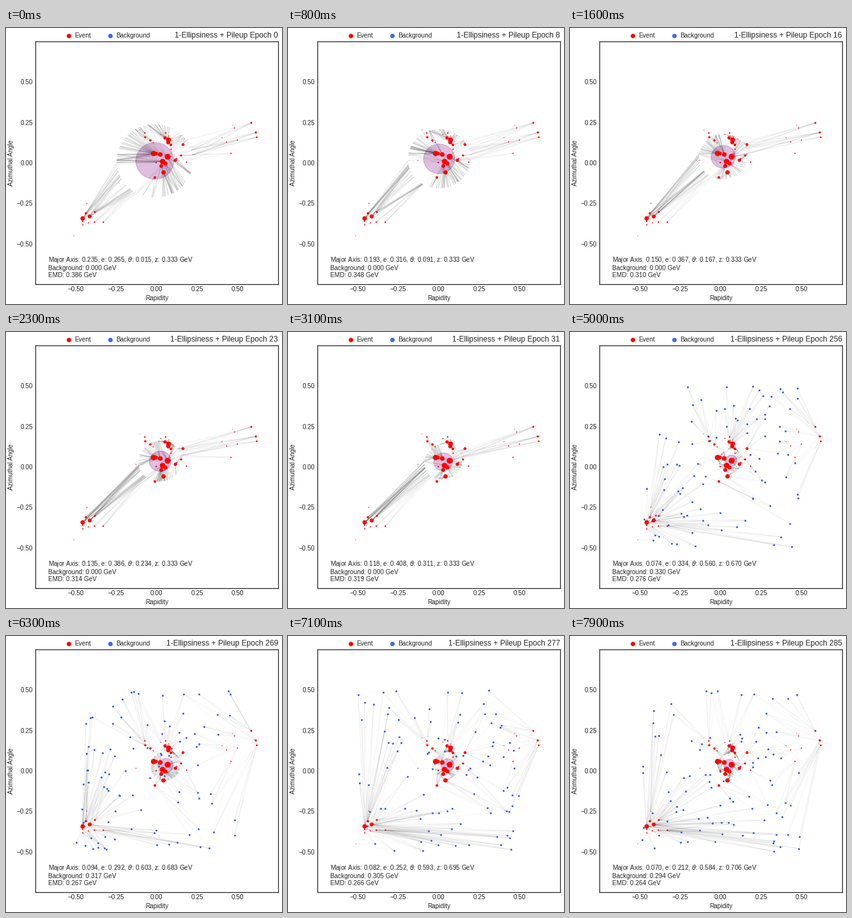
Write a matplotlib script that moves like this. It is 432x432 px and loops after 8000 ms.

```python
import numpy as np
import matplotlib.pyplot as plt
from matplotlib.animation import FuncAnimation
from matplotlib.collections import LineCollection
from matplotlib.patches import Ellipse

FRAMES, INTERVAL = 80, 100
SWITCH, SKIP = 44, 206          # the epoch counter jumps once
CX, CY, UNIT = 235.8, 211.0, 760 / 3
RING, DOTS = 100, 95
INK = "0.15"

plt.rcParams.update({
    "font.family": "Liberation Sans", "font.size": 10,
    "text.color": INK, "axes.labelcolor": INK,
    "xtick.color": INK, "ytick.color": INK,
    "axes.edgecolor": INK, "axes.linewidth": 1.25,
})

# Main event particles: x, y, radius in stage pixels
MAIN = [(120, 298, 3.5), (131, 295, 3.1), (125, 290, 1.8), (139, 288, 1.5),
        (218, 171, 1.7), (226, 176, 1.8), (231, 196.5, 4.2), (235, 196.5, 2.7),
        (241.5, 198, 3.6), (249, 172, 2.6), (254.5, 175, 3.8), (254, 179, 3.2),
        (258, 183, 2), (277, 182.5, 2.2), (274, 199.5, 1.6), (265, 207, 2.6),
        (253, 201.5, 4.6), (245, 209, 4.3), (249.5, 212, 3.2), (243, 216, 3),
        (246.5, 226, 3.4), (233, 234, 2), (384, 148.5, 1.5), (391, 163.5, 1.7),
        (392.5, 171, 1.3)]


def specks(n, x, y, dx, dy, rng):
    """Tiny particles scattered around a point."""
    return np.column_stack([rng.normal(x, dx, n), rng.normal(y, dy, n),
                            rng.uniform(.5, 1.2, n)])


seed = np.random.default_rng(4)
EVENT = np.vstack([MAIN,
                   specks(7, 129, 300, 14, 16, seed),
                   specks(12, 250, 185, 22, 26, seed),
                   specks(6, 343, 172, 14, 20, seed)])
MASS = EVENT[:, 2] ** 2 / np.sum(EVENT[:, 2] ** 2)

# Key poses: frame -> major axis, e, theta, z, EMD, centre x, centre y
EARLY = {0: (.235, .265, .015, .333, .386, 233, 208),
         16: (.150, .367, .167, .333, .310, 240, 201.5),
         31: (.118, .408, .311, .333, .319, 243, 203),
         41: (.133, .348, .425, .333, .309, 239, 197)}
LATE = {50: (.074, .334, .560, .670, .276, 252, 201.5),
        63: (.094, .292, .603, .683, .267, 250, 203),
        79: (.070, .212, .584, .706, .264, 249, 201.5)}


def pose(i):
    keys = EARLY if i < SWITCH else LATE
    return [np.interp(i, list(keys), col) for col in zip(*keys.values())]


def transport(pts, weights):
    """Smoothed optimal flow from event particles to the given points."""
    cost = np.hypot(EVENT[:, None, 0] - pts[:, 0], EVENT[:, None, 1] - pts[:, 1])
    kernel = np.exp(-cost / 1.4) + 1e-200
    v = np.ones(len(pts))
    for _ in range(250):
        u = MASS / (kernel @ v)
        v = weights / (kernel.T @ u)
    return u[:, None] * kernel * v


def ring(major, e, theta, cx, cy, rng):
    t = rng.uniform(0, 2 * np.pi, RING)
    a = major * UNIT * np.cos(t)
    b = major * UNIT * np.sqrt(1 - e * e) * np.sin(t)
    c, s = np.cos(theta), np.sin(theta)
    return np.column_stack([cx + a * c - b * s, cy - a * s - b * c])


fig = plt.figure(figsize=(6, 6), dpi=72, facecolor="white")
ax = fig.add_axes([45.8 / 432, 31 / 432, 380 / 432, 380 / 432])
ax.set_xlim(45.8, 425.8)
ax.set_ylim(401, 21)
ticks = np.array([-.5, -.25, 0, .25, .5])
labels = [f"{t:.2f}".replace("-", "\u2212") for t in ticks]
ax.set_xticks(CX + UNIT * ticks, labels)
ax.set_yticks(CY - UNIT * ticks, labels)
ax.tick_params(length=0, pad=3.5)
ax.set_xlabel("Rapidity")
ax.set_ylabel("Azimuthal Angle")

for x, name, color in ((97.8, "Event", "red"), (163, "Background", "royalblue")):
    ax.scatter([x], [11.8], s=49, c=color, lw=0, clip_on=False)
    ax.text(x + 9.5, 14.6, name)

title = ax.text(425.8, 15.5, "", size=12, ha="right")
info = [ax.text(65.5, y, "") for y in (366.5, 379.3, 390)]
blob = Ellipse((0, 0), 1, 1, color="purple", alpha=.25, zorder=1)
ax.add_patch(blob)
flows = LineCollection([], linewidths=1, zorder=2)
ax.add_collection(flows, autolim=False)
noise = ax.scatter([], [], s=9.5, c="royalblue", lw=0, zorder=3)
ax.scatter(EVENT[:, 0], EVENT[:, 1], s=(2 * EVENT[:, 2]) ** 2, c="red", lw=0, zorder=4)


def update(i):
    rng = np.random.default_rng(500 + i)
    late = i >= SWITCH
    major, e, theta, z, emd, cx, cy = pose(i)
    back = 1 - z if late else 0

    n = DOTS if late else 0
    dots = [CX, CY] + UNIT * rng.uniform(-.5, .5, (n, 2))
    noise.set_offsets(dots)

    pts = np.vstack([ring(major, e, theta, cx, cy, rng), dots])
    weights = np.repeat([(1 - back) / RING, back / DOTS], [RING, n])
    plan = transport(pts, weights)
    src, dst = np.nonzero(plan > .05 * weights)
    flows.set_segments(np.stack([EVENT[src, :2], pts[dst]], axis=1))
    rgba = np.zeros((len(src), 4))
    rgba[:, 3] = np.clip(.025 + 13 * plan[src, dst], 0, .13)
    flows.set_color(rgba)

    blob.set_center((cx, cy))
    blob.width = major * UNIT
    blob.height = blob.width * np.sqrt(1 - e * e)
    blob.angle = -np.degrees(theta)

    title.set_text(f"1-Ellipsiness + Pileup Epoch {i + SKIP * late}")
    info[0].set_text(f"Major Axis: {major:.3f}, e: {e:.3f}, "
                     rf"$\theta$: {theta:.3f}, z: {z:.3f} GeV")
    info[1].set_text(f"Background: {back:.3f} GeV")
    info[2].set_text(f"EMD: {emd:.3f} GeV")
    return []


anim = FuncAnimation(fig, update, frames=FRAMES, interval=INTERVAL,
                     repeat=True, repeat_delay=0, blit=False)
plt.show()
```
